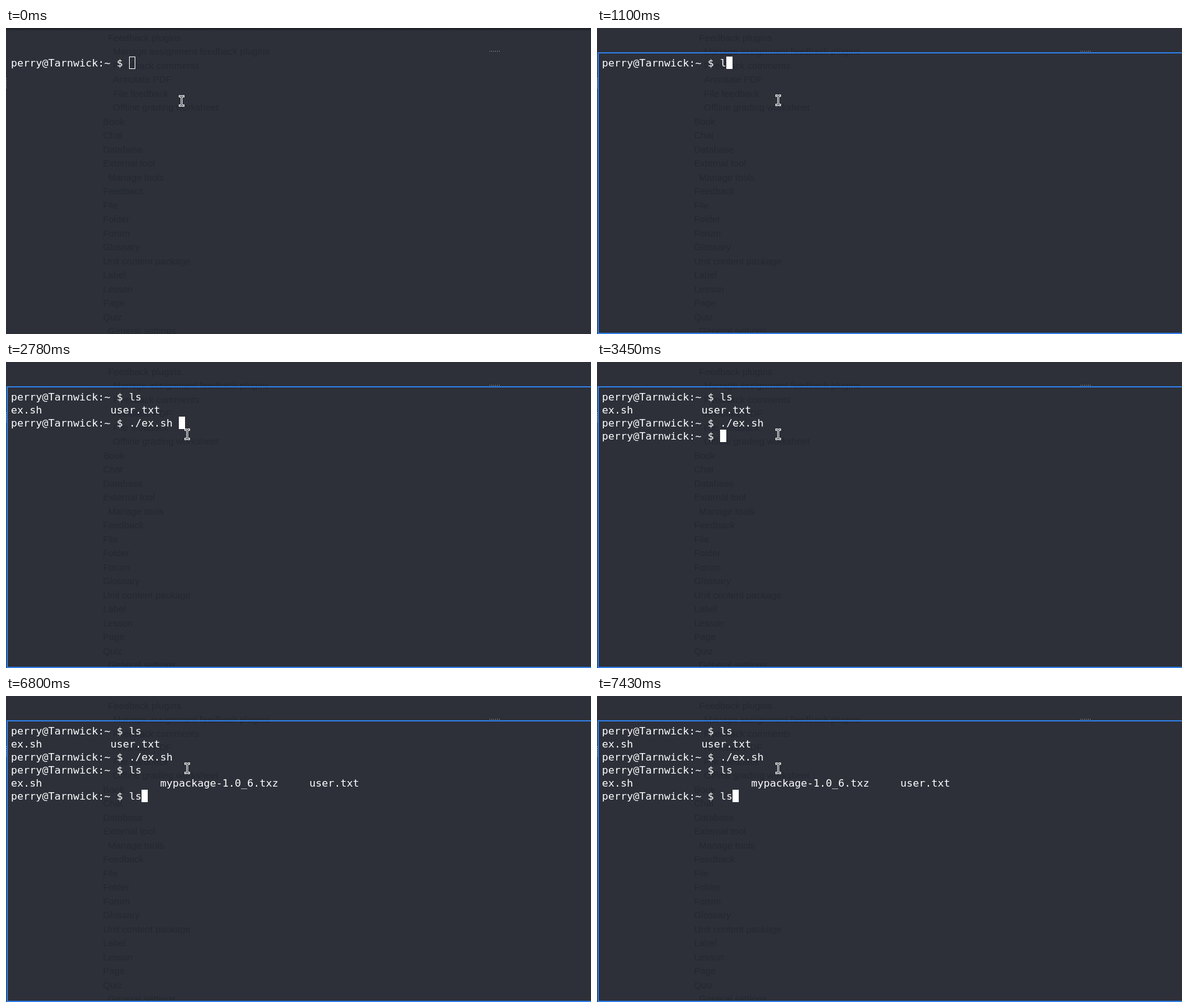
An HTML page for the animation above (8000 ms loop, 941 px wide and 493 px high).

```html
<!DOCTYPE html>
<html lang="en">
<head>
<meta charset="utf-8">
<title>Terminal session</title>
<style>
html, body { margin: 0; width: 100%; height: 100%; overflow: hidden; background: #2d3039; }
svg { display: block; }
text { white-space: pre; }
#menu { font: 15px "Liberation Sans", Arial, sans-serif; fill: #242831; }
#term { font: 16.61px "DejaVu Sans Mono", monospace; fill: #fff; }
</style>
</head>
<body>
<svg width="941" height="493" viewBox="0 0 941 493">
  <defs>
    <linearGradient id="fade" x2="0" y2="1">
      <stop stop-color="#1b1d24"/>
      <stop offset="1" stop-color="#1b1d24" stop-opacity="0"/>
    </linearGradient>
  </defs>
  <g id="menu"></g>
  <rect id="shadow" width="941" height="5" fill="url(#fade)"/>
  <g stroke="#a9abb0" stroke-dasharray="1 2">
    <path d="M778 37.5h18"/>
    <path d="M.5 81v18"/>
  </g>
  <path id="frame" d="M942 40H2V492H942" fill="none" stroke="#2f7fe6" stroke-width="2"/>
  <g id="term"></g>
  <rect id="caret" stroke="#fff" width="9" height="19"/>
  <g id="mouse" fill="none" stroke-linecap="square">
    <path id="beam" d="M-3-7.5H-1.5L0-6.5 1.5-7.5H3M0-6.5V6.5M-3 7.5H-1.5L0 6.5 1.5 7.5H3" stroke="#fff" stroke-width="3"/>
    <use href="#beam"/>
    <path d="M-3-7.5H-1.5L0-6.5 1.5-7.5H3M0-6.5V6.5M-3 7.5H-1.5L0 6.5 1.5 7.5H3" stroke="#16181d"/>
  </g>
</svg>
<script>
const $ = id => document.getElementById(id);
const LOOP = 8000, COL = 10, ROW = 21, LEFT = 8, TOP = 46;

function addText(parent, x, y, str = '') {
  const el = document.createElementNS('http://www.w3.org/2000/svg', 'text');
  el.setAttribute('x', x);
  el.setAttribute('y', y);
  el.textContent = str;
  return parent.appendChild(el);
}

// Faint menu showing through the window; leading spaces mark the indent level.
const menu = [' Feedback plugins', '  Manage assignment feedback plugins', '  Feedback comments',
  '  Annotate PDF', '  File feedback', '  Offline grading worksheet', 'Book', 'Chat', 'Database',
  'External tool', ' Manage tools', 'Feedback', 'File', 'Folder', 'Forum', 'Glossary',
  'Unit content package', 'Label', 'Lesson', 'Page', 'Quiz', ' General settings'];
menu.forEach((item, i) => {
  const label = item.trimStart();
  addText($('menu'), 156 + 8 * (item.length - label.length), Math.round(20.8 + 22.5 * i), label);
});

const rows = Array.from({ length: 6 }, (_, i) => addText($('term'), LEFT, TOP + 16 + ROW * i));

const prompt = 'perry@Tarnwick:~ $ ';
const pack = 'mypackage-1.0_6.txz';
const listed = prompt + 'ls\n' + 'ex.sh'.padEnd(16) + 'user.txt\n' + prompt;
const ran = listed + './ex.sh\n';
const again = ran + prompt;
const last = again + 'ls\n' + 'ex.sh'.padEnd(24) + pack.padEnd(24) + 'user.txt\n' + prompt;

const screens = [
  [0, prompt], [1100, prompt + 'l'], [1200, prompt + 'ls'],
  [1350, listed], [2080, listed + '.'], [2300, listed + './'], [2400, listed + './e'],
  [2630, listed + './ex'], [2780, listed + './ex.sh '],
  [3400, ran], [3450, again], [3950, again + 'l'], [4050, again + 'ls'],
  [4150, last],
  // Stepping back through the command history
  [6800, last + 'ls'], [6950, last + './ex.sh'], [7100, last + 'ls'],
  [7210, last + 'clear'], [7320, last + 'rm ' + pack], [7430, last + 'ls']
];
const pointer = [[0, [282.5, 117.5]], [450, [287.5, 117.5]], [480, [291.5, 116.5]]];

const at = (steps, t) => steps.findLast(([start]) => t >= start)[1];

function draw(t) {
  const lines = at(screens, t).split('\n');
  rows.forEach((row, i) => {
    const str = lines[i] || '';
    if (row.textContent !== str) row.textContent = str;
  });
  const focused = t >= 280;
  const end = lines.length - 1;
  $('caret').setAttribute('x', LEFT + COL * lines[end].length + 0.5);
  $('caret').setAttribute('y', TOP + ROW * end + 0.5);
  $('caret').setAttribute('fill', focused ? '#fff' : 'none');
  $('frame').style.display = focused ? '' : 'none';
  $('shadow').style.display = t < 450 ? '' : 'none';
  $('mouse').setAttribute('transform', `translate(${at(pointer, t)})`);
}

const start = performance.now();
function tick() {
  draw((performance.now() - start) % LOOP);
  requestAnimationFrame(tick);
}
tick();
</script>
</body>
</html>
```
